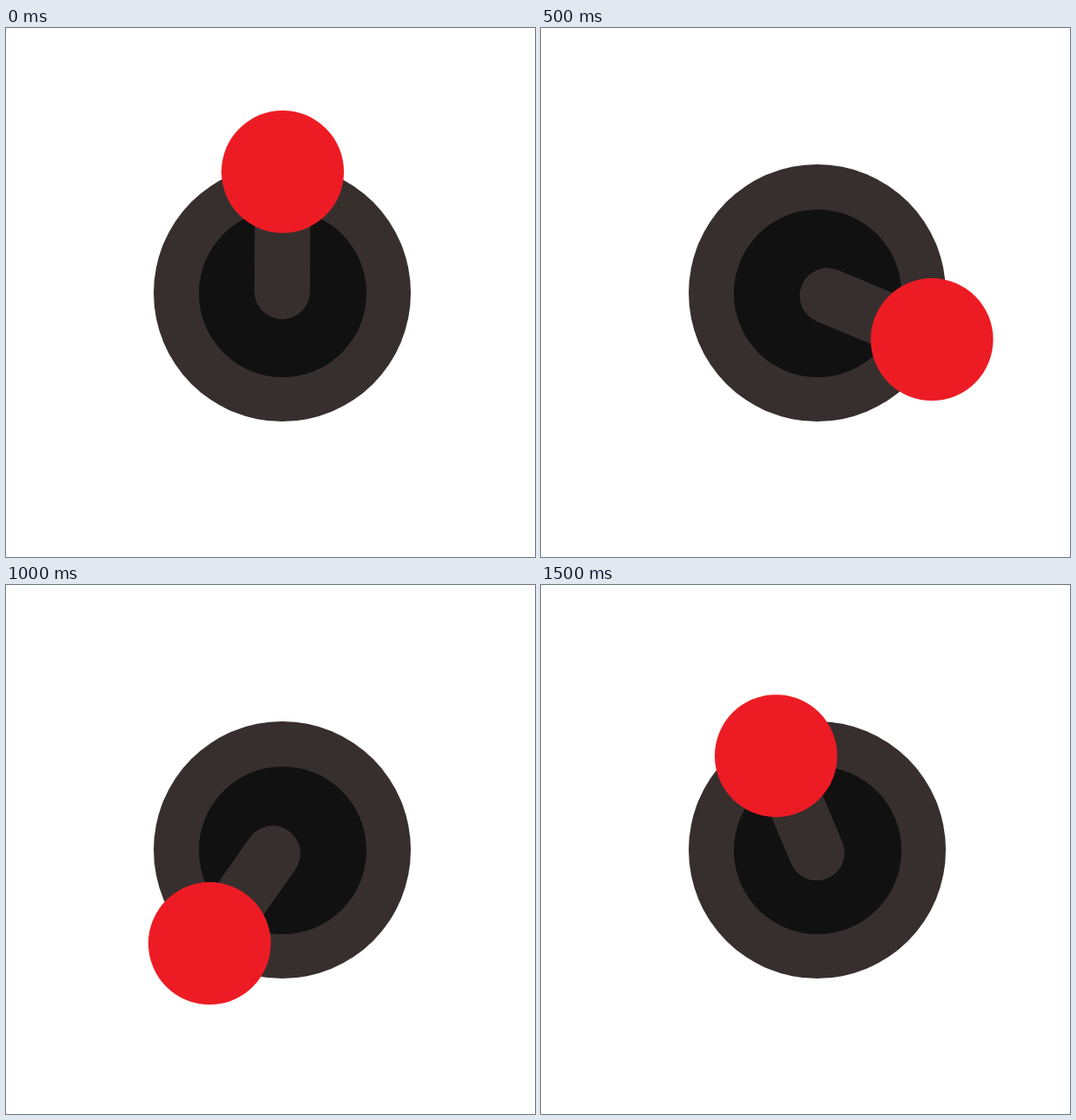
These frames come from a looping animation (609x609 px, 1.6 s). An HTML page:

```html
<!DOCTYPE html>
<html lang="en">
<head>
<meta charset="utf-8">
<title>Joystick</title>
<style>
  html, body { margin: 0; height: 100%; overflow: hidden; background: #fff; }
  svg { display: block; width: 100vw; height: 100vh; }
</style>
</head>
<body>
<svg viewBox="0 0 609 609">
  <circle cx="318" cy="305" r="148" fill="#372f2e"/>
  <circle cx="318.5" cy="305.5" r="96.5" fill="#111"/>
  <path id="stick" stroke="#372f2e" stroke-width="64" stroke-linecap="round"/>
  <circle id="ball" r="70.5" fill="#ed1c24"/>
</svg>
<script>
  const STEP = 100, STEPS = 16;
  const { sin, cos, PI } = Math;
  const stick = document.getElementById('stick');
  const ball = document.getElementById('ball');

  // Key poses of the ball: step, degrees clockwise from up, distance from the centre
  const poses = [
    [0, 0, 139], [2, 41.5, 128], [4, 90, 141],
    [6, 134.7, 143.5], [7, 154.6, 133], [8, 180, 149],
    [10, 217.9, 137], [12, 266.7, 137], [15, 336, 118]
  ];

  function ballAt(step) {
    const next = Math.max(1, poses.findIndex(p => p[0] >= step));
    const a = poses[next - 1], b = poses[next];
    const k = (step - a[0]) / (b[0] - a[0]);
    const [, degrees, distance] = a.map((v, i) => v + (b[i] - v) * k);
    const angle = degrees * PI / 180;
    return [318.5 + distance * sin(angle), 304.5 - distance * cos(angle)];
  }

  // The foot circles the centre loosely, with a wobble twice per turn
  function footAt(step) {
    const turn = step / STEPS * 2 * PI, lag = turn - PI / 4;
    const wobble = 4.4 * cos(2 * lag);
    return [318 + 9.5 * sin(turn) - wobble, 307.5 - 6 * cos(lag) - wobble];
  }

  function draw(time) {
    const step = Math.floor(time / STEP) % STEPS;
    const [x, y] = ballAt(step);
    ball.setAttribute('cx', x);
    ball.setAttribute('cy', y);
    stick.setAttribute('d', `M${footAt(step)}L${x} ${y}`);
  }

  let start;
  function tick(now) {
    start ??= now;
    draw(now - start);
    requestAnimationFrame(tick);
  }
  draw(0);
  requestAnimationFrame(tick);
</script>
</body>
</html>
```
